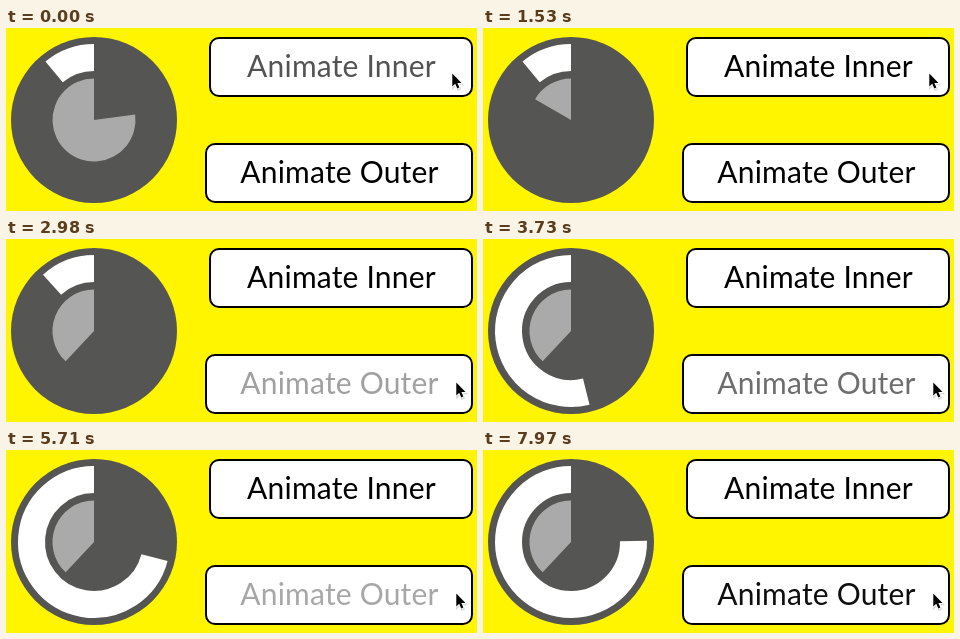
Recreate the animation shown at these times as an HTML page. Size 471 by 183 pixels, loop 8000 ms.

```html
<!DOCTYPE html>
<html lang="en">
<head>
<meta charset="utf-8">
<title>Animated arcs</title>
<style>
  html, body { margin: 0; width: 100%; height: 100%; overflow: hidden; background: #fff500; }
  svg { display: block; width: 471px; height: 183px; }
  text { font: 400 30px Lato, "Open Sans", sans-serif; letter-spacing: .2px; text-anchor: middle; }
  .button { fill: #fff; stroke: #000; stroke-width: 2; }
</style>
</head>
<body>
<svg viewBox="0 0 471 183">
  <defs><path id="arrow" d="M0 0V14L3.2 11.2L5.4 16.2L7.7 15.2L5.5 10.3H10Z"/></defs>
  <circle cx="88" cy="92" r="83" fill="#555553"/>
  <path id="ring" fill="none" stroke="#fff" stroke-width="27"/>
  <path id="wedge" fill="#aaa"/>
  <rect class="button" x="204" y="10" width="262" height="58" rx="9"/>
  <rect class="button" x="200" y="116" width="266" height="58" rx="9"/>
  <text id="innerLabel" x="335.5" y="48.7">Animate Inner</text>
  <text id="outerLabel" x="333.5" y="154.7">Animate Outer</text>
  <g id="cursor">
    <use href="#arrow" x=".6" y="1.6" stroke="#000" stroke-width="2" opacity=".15"/>
    <use href="#arrow" stroke="#fff" stroke-width="2" stroke-linejoin="round" paint-order="stroke"/>
  </g>
</svg>
<script>
const LOOP = 8000, CX = 88, CY = 92;
const PACE = 685, HOLD = 140, ARC_MS = 250, FADE_MS = 360;
const $ = id => document.getElementById(id);

// Clicks come at a steady pace; angles run counterclockwise from the top.
const inner = { firstPress: -340, from: 122, angles: [295, 14, 60, 137] };
const outer = { firstPress: 2735, from: 39.7, angles: [46, 240, 254, 246, 275, 7.6, 332, 271] };

function ease(t) {
  t = Math.min(1, Math.max(0, t));
  return t * t * (3 - 2 * t);
}

function stateAt({ firstPress, from, angles }, t) {
  let angle = from, alpha = 1;
  angles.forEach((target, i) => {
    const pressed = t - firstPress - i * PACE;
    if (pressed < 0) return;
    alpha = 0.2 + 0.8 * ease((pressed - HOLD) / FADE_MS);
    angle += (target - angle) * ease((pressed - HOLD) / ARC_MS);
  });
  return { angle, alpha };
}

function arc(radius, angle) {
  const a = angle * Math.PI / 180;
  const x = CX - radius * Math.sin(a), y = CY - radius * Math.cos(a);
  return `M${CX} ${CY - radius}A${radius} ${radius} 0 ${angle > 180 ? 1 : 0} 0 ${x} ${y}`;
}

function draw(t) {
  const a = stateAt(inner, t), b = stateAt(outer, t);
  $("wedge").setAttribute("d", `${arc(41.5, a.angle)}L${CX} ${CY}Z`);
  $("ring").setAttribute("d", arc(62.5, b.angle));
  $("innerLabel").setAttribute("opacity", a.alpha);
  $("outerLabel").setAttribute("opacity", b.alpha);

  const move = ease((t - 2105) / 420);
  const x = 446.3 + 4 * move + 6 * Math.sin(Math.PI * move);
  const y = 45.5 + 98 * move;
  $("cursor").setAttribute("transform", `translate(${x} ${y}) scale(.92)`);
}

function tick() {
  draw(performance.now() % LOOP);
  requestAnimationFrame(tick);
}
tick();
</script>
</body>
</html>
```
